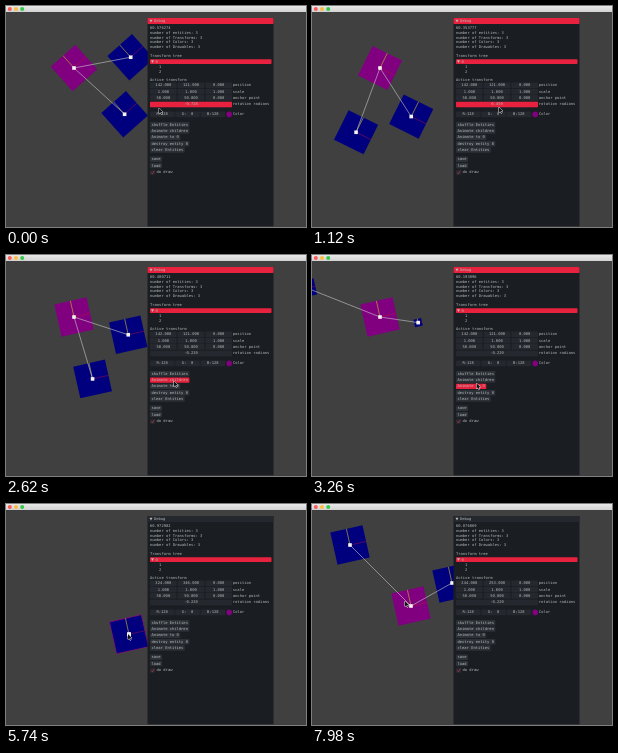
An HTML page with a canvas that plays this animation: 300 px wide and 221 px high, repeating every 8 s.

```html
<!DOCTYPE html>
<html lang="en">
<head>
<meta charset="utf-8">
<title>Entity debug panel</title>
<style>
html, body { margin: 0; width: 100%; height: 100%; overflow: hidden; background: #404040; }
canvas { display: block; width: 300px; height: 221px; }
</style>
</head>
<body>
<canvas id="stage"></canvas>
<script>
const W = 300, H = 221, LOOP = 8000;
const SIDE = 33, REST = 31.4, BAR = 6, CHAR = 2.28;
const RED = '#e8223e', FIELD = '#25282e', TEXT = '#b4bbb9';
const PURPLE = '#800080', BLUE = '#00007f';

const canvas = document.getElementById('stage');
const ctx = canvas.getContext('2d');
const ratio = window.devicePixelRatio || 1;
canvas.width = W * ratio;
canvas.height = H * ratio;

const linear = p => p;
const smooth = p => p * p * (3 - 2 * p);
const quad = p => p < 0.5 ? 2 * p * p : 1 - 2 * (1 - p) * (1 - p);

// Interpolates rows of [time, ...values].
function track(keys, t, ease) {
  let i = 0;
  while (i < keys.length - 1 && keys[i + 1][0] <= t) i++;
  const a = keys[i], b = keys[i + 1];
  if (!b) return a.slice(1);
  const p = ease(Math.max(0, (t - a[0]) / (b[0] - a[0])));
  return a.slice(1).map((v, k) => v + (b[k + 1] - v) * p);
}

function turn(x, y, angle) {
  const c = Math.cos(angle), s = Math.sin(angle);
  return [x * c - y * s, x * s + y * c];
}

const scrub = [[0, 153, 102], [860, 198, 101], [1120, 187, 101], [1640, 167.57, 101]];
const pointer = [
  [1640, 167.57, 101], [1850, 167.57, 101], [2400, 168, 126], [2800, 168, 126],
  [3900, 159, 132], [4500, 159, 132], [4960, 68, 62], [5000, 68, 62],
  [5640, 122, 130], [5900, 122, 130], [6700, 157, 124.5], [7060, 157, 124.5],
  [7440, 117, 127], [7460, 117, 127], [7900, 93, 97]
];
const parentPath = [
  [0, 68, 62], [5000, 68, 62], [5640, 123, 130.3], [7460, 123, 130.3], [7900, 99, 102]
];

// Offsets are local to the parent: time, x, y, side.
const SETTLED = -0.22;
function childPath(start, away, awaySide, last) {
  const far = turn(away[0], away[1], -SETTLED);
  const end = turn(last[0], last[1], -SETTLED);
  return [
    [0, ...start, SIDE], [2500, ...start, SIDE], [3500, ...far, awaySide],
    [4150, ...far, awaySide], [5150, 0, 0, REST], [6950, 0, 0, REST],
    [7950, ...end, SIDE]
  ];
}
const children = [
  childPath([49.5, 29.7], [36, 4], 4.6, [41, -23]),
  childPath([7, 68.2], [-85, -41], 14.5, [-61, -61])
];

function box(x, y, w, h, color) {
  ctx.fillStyle = color;
  ctx.beginPath();
  ctx.roundRect(x, y, w, h, 0.7);
  ctx.fill();
}

function label(str, x, y, align = 'left') {
  ctx.fillStyle = TEXT;
  ctx.textAlign = align;
  ctx.fillText(str, x, y);
}

function disc(x, y, r, color) {
  ctx.fillStyle = color;
  ctx.beginPath();
  ctx.arc(x, y, r, 0, Math.PI * 2);
  ctx.fill();
}

function line(x1, y1, x2, y2, color, width) {
  ctx.strokeStyle = color;
  ctx.lineWidth = width;
  ctx.beginPath();
  ctx.moveTo(x1, y1);
  ctx.lineTo(x2, y2);
  ctx.stroke();
}

function triangle(x, y) {
  ctx.fillStyle = TEXT;
  ctx.beginPath();
  ctx.moveTo(x, y - 1.3);
  ctx.lineTo(x + 3, y - 1.3);
  ctx.lineTo(x + 1.5, y + 1.4);
  ctx.fill();
}

function square(x, y, side, angle, color) {
  ctx.save();
  ctx.translate(x, y);
  ctx.rotate(angle);
  ctx.fillStyle = color;
  ctx.fillRect(-side / 2, -side / 2, side, side);
  line(0, 0, side / 2, 0, 'rgba(215,20,40,.6)', 0.6);
  line(0, 0, 0, -side / 2, 'rgba(185,170,50,.9)', 0.7);
  ctx.restore();
}

function dot(x, y) {
  ctx.fillStyle = '#f4f4ee';
  ctx.fillRect(x - 1.8, y - 1.8, 3.6, 3.6);
}

function scene(t, parent, angle) {
  const [px, py] = parent;
  const kids = children.map(path => {
    const [x, y, side] = track(path, t, quad);
    const [dx, dy] = turn(x, y, angle);
    return { x: px + dx, y: py + dy, side };
  });
  square(px, py, SIDE, angle, PURPLE);
  kids.forEach(k => square(k.x, k.y, k.side, angle, BLUE));
  kids.forEach(k => line(px, py, k.x, k.y, '#c9c9c9', 0.6));
  kids.forEach(k => dot(k.x, k.y));
  dot(px, py);
}

function windowBar() {
  const shade = ctx.createLinearGradient(0, 0, 0, BAR);
  shade.addColorStop(0, '#e8e8e8');
  shade.addColorStop(1, '#d2d2d2');
  ctx.fillStyle = shade;
  ctx.fillRect(0, 0, W, BAR);
  ['#fc5b57', '#fdbc40', '#34c84a'].forEach((color, i) =>
    disc(3.8 + i * 6.2, 3, 2, color));
}

function fields(values, name, y) {
  const w = (82 - (values.length - 1)) / values.length;
  values.forEach((v, i) => {
    const x = 144 + i * (w + 1);
    box(x, y - 2.8, w, 5.6, FIELD);
    label(v, x + w / 2, y, 'center');
  });
  label(name, 226.8, y);
}

function panel(t, parent, angle) {
  ctx.font = '3.79px "DejaVu Sans Mono", monospace';
  ctx.textBaseline = 'middle';
  ctx.fillStyle = '#1a1d22';
  ctx.fillRect(141.5, 12, 126, H - 12.7);

  const focused = t < 5020 || (t >= 6860 && t < 7460);
  box(141.5, 12, 126, 6, focused ? RED : '#24272d');
  triangle(143.5, 15);
  label('Debug', 148, 15);

  const tick = Math.floor(t / 800);
  const noise = Math.abs(Math.sin(tick * 12.9898 + 4) * 43758.5453) % 1;
  label((60 + noise).toFixed(6), 144, 21.8);
  ['entities', 'Transforms', 'Colors', 'Drawables'].forEach((name, i) =>
    label(`number of ${name}: 3`, 144, 27 + i * 4.7));

  label('Transform tree', 144, 50.2);
  box(144, 53.2, 121.5, 4.8, RED);
  triangle(145, 55.6);
  label('0', 149.5, 55.6);
  label('1', 153, 61);
  label('2', 153, 66);

  label('Active transform', 144, 73.8);
  const x = 142 + (parent[0] - 68) * 3.3, y = 121 + (parent[1] - 62) * 3.3;
  const fix = v => Math.round(v).toFixed(3);
  fields([fix(x), fix(y), '0.000'], 'position', 79.3);
  fields(['1.000', '1.000', '1.000'], 'scale', 85.6);
  fields(['50.000', '50.000', '0.000'], 'anchor point', 91.9);
  fields([angle.toFixed(3)], 'rotation radians', 98.5);
  if (t < 1900) {
    box(144, 95.7, 82, 5.6, RED);
    label(angle.toFixed(3), 185, 98.5, 'center');
  }

  ['R:128', 'G:  0', 'B:128'].forEach((v, i) => {
    box(144 + i * 25.3, 105.6, 24.5, 5.6, FIELD);
    label(v, 156.2 + i * 25.3, 108.4, 'center');
  });
  disc(223.2, 108.4, 2.8, PURPLE);
  label('Color', 227, 108.4);

  const hot = (t > 2150 && t < 3200) || (t > 6600 && t < 7180) ? 1
    : t >= 3200 && t < 4590 ? 2 : -1;
  ['shuffle Entities', 'Animate children', 'Animate to 0', 'destroy entity 0',
    'clear Entities', 'save', 'load'].forEach((name, i) => {
    const row = 118.8 + i * 6.3 + (i > 4 ? 3 : 0);
    box(144, row - 2.7, name.length * CHAR + 2.9, 5.4, i === hot ? RED : '#2c3037');
    label(name, 145.5, row);
  });
  box(144, 163.8, 5.2, 5.2, FIELD);
  ctx.strokeStyle = '#c23a49';
  ctx.lineWidth = 0.7;
  ctx.beginPath();
  ctx.moveTo(145.1, 166.4);
  ctx.lineTo(146.4, 167.8);
  ctx.lineTo(148.4, 164.8);
  ctx.stroke();
  label('do draw', 150.5, 166.4);
}

function arrow([x, y]) {
  ctx.save();
  ctx.translate(x, y);
  ctx.beginPath();
  ctx.moveTo(0, 0);
  ctx.lineTo(0, 5.4);
  ctx.lineTo(1.3, 4.3);
  ctx.lineTo(2.2, 6.3);
  ctx.lineTo(3, 5.9);
  ctx.lineTo(2.2, 4);
  ctx.lineTo(3.9, 3.9);
  ctx.closePath();
  ctx.fillStyle = '#111';
  ctx.strokeStyle = '#f5f5f5';
  ctx.lineWidth = 0.9;
  ctx.stroke();
  ctx.fill();
  ctx.restore();
}

function draw(t) {
  ctx.setTransform(ratio, 0, 0, ratio, 0, 0);
  ctx.fillStyle = '#404040';
  ctx.fillRect(0, 0, W, H);

  const drag = track(scrub, t, linear);
  const angle = -0.73 + 0.035 * (drag[0] - 153);
  const parent = track(parentPath, t, smooth);
  scene(t, parent, angle);
  windowBar();
  panel(t, parent, angle);
  arrow(t < 1640 ? drag : track(pointer, t, smooth));
}

const begin = performance.now();
function loop() {
  draw((performance.now() - begin) % LOOP);
  requestAnimationFrame(loop);
}
loop();
</script>
</body>
</html>
```
